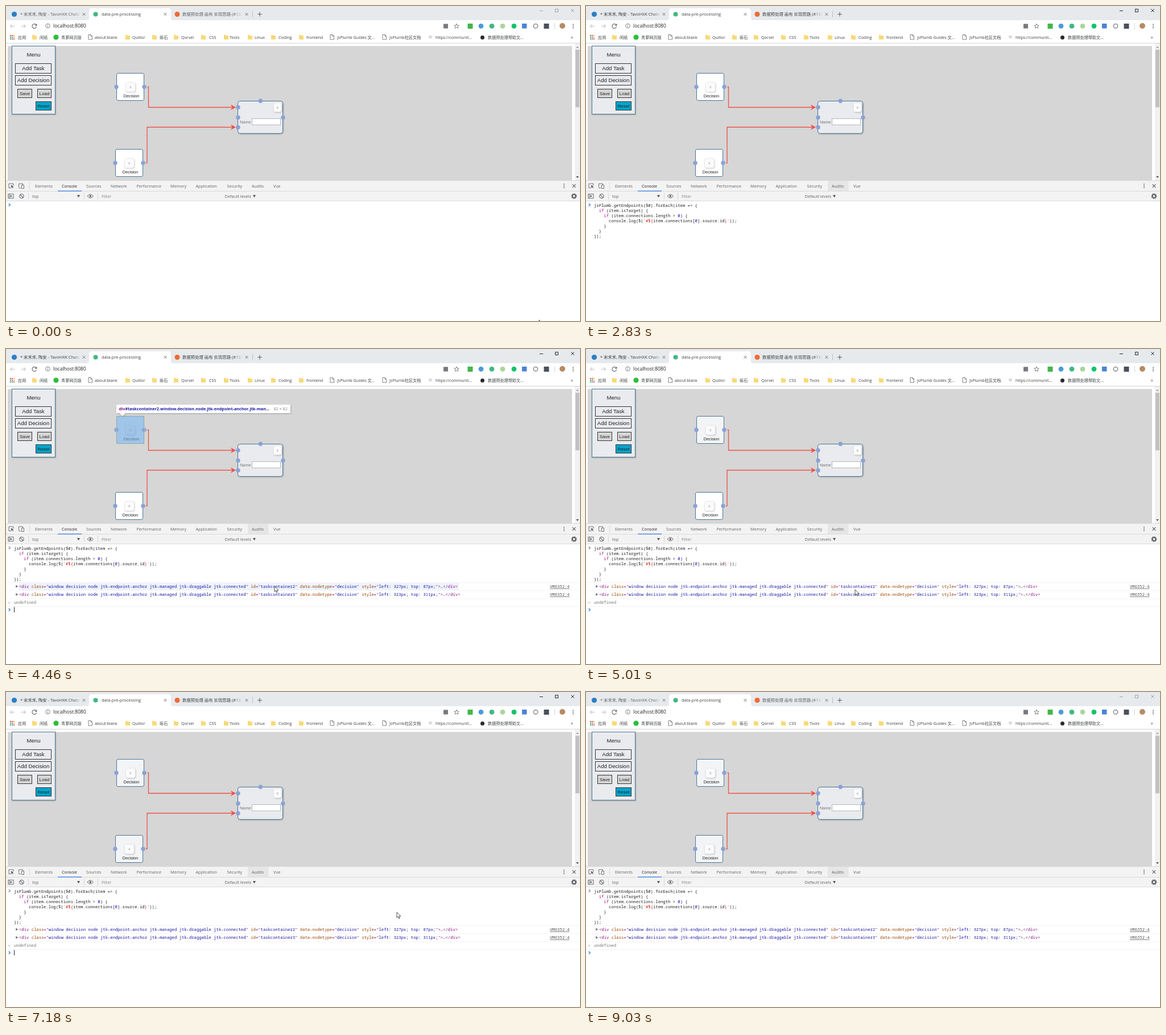
Write an HTML page that moves like this. It is 1009x555 px and loops after 9110 ms.

```html
<!DOCTYPE html>
<html lang="zh">
<head>
<meta charset="utf-8">
<title>Flow editor console</title>
<style>
html, body { margin: 0; width: 100%; height: 100%; overflow: hidden; background: #fff; }
svg { display: block; width: 1009px; height: 555px; }
text { white-space: pre; font-family: "Open Sans", "Noto Sans CJK SC", "Noto Sans CJK", sans-serif; }
.page { font-family: "Liberation Sans", Arial, sans-serif; }
.mono { font-family: "Noto Sans Mono", "DejaVu Sans Mono", monospace; }
</style>
</head>
<body>
<svg id="stage" viewBox="0 0 1009 555" xmlns="http://www.w3.org/2000/svg"></svg>
<script>
const LOOP = 9110;
const BLUE = '#4a7799', RED = '#ef4f48', STRIP = '#e7eaed', BAR = '#f3f3f3', INK = '#3c4043', GREY = '#5f6368';

const rect = (x, y, w, h, fill, more = '') =>
  `<rect x="${x}" y="${y}" width="${w}" height="${h}" fill="${fill}" ${more}/>`;
const dot = (x, y, r, fill, more = '') => `<circle cx="${x}" cy="${y}" r="${r}" fill="${fill}" ${more}/>`;
const line = (d, color, width = 1, more = '') =>
  `<path d="${d}" fill="none" stroke="${color}" stroke-width="${width}" ${more}/>`;
const fill = (d, color, more = '') => `<path d="${d}" fill="${color}" ${more}/>`;
const text = (x, y, s, size = 7.25, color = INK, more = '') =>
  `<text x="${x}" y="${y}" font-size="${size}" fill="${color}" ${more}>${s}</text>`;
const page = (x, y, s, size, color = '#222', more = '') => text(x, y, s, size, color, 'class="page" ' + more);
const mono = (x, y, s, color = '#222', more = '') => text(x, y, s, 7.23, color, 'class="mono" ' + more);
const group = (id, body, more = '') => `<g id="${id}" ${more}>${body}</g>`;
const span = (s, color) => `<tspan fill="${color}">${s}</tspan>`;
const cross = (x, y, r, color, width = 0.9) =>
  line(`M${x - r} ${y - r}l${2 * r} ${2 * r}m0 ${-2 * r}l${-2 * r} ${2 * r}`, color, width);
const more3 = (x, y) => [-3, 0, 3].map(d => dot(x, y + d, 0.9, GREY)).join('');
const down = (x, y, color = '#5a5a5a') => fill(`M${x - 2.6} ${y - 2}h5.2l-2.6 4.4z`, color);

function tabs() {
  const fade = x => rect(x, 6, 14, 17, 'url(#fade)') + rect(x + 13.5, 6, 26, 17, STRIP);
  return rect(0, 0, 1009, 25, STRIP) +
    group('titles', text(25, 17.3, '* 宋禾禾, 陶安 - TavoHXK Chats', 7.4) +
      text(310, 17.3, '数据预处理 画布 实现思路 (#133', 7.4)) +
    fade(118) + fade(402) +
    fill('M142 25q4 0 4-4V9q0-5 5-5H285q5 0 5 5V21q0 4 4 4z', '#fff') +
    dot(14.5, 14.5, 4.6, '#2d7fc4') + dot(157.5, 14.5, 4, '#41b883') + dot(301, 14.5, 4.5, '#ee6b35') +
    text(168, 17.3, 'data-pre-processing', 7.45) +
    [137, 280, 423].map(x => cross(x, 14.5, 2.4, GREY)).join('') +
    line('M433.5 9v11', '#a9adb2', 0.7) + line('M442 14.5h8M446 10.5v8', GREY, 1.1) +
    group('buttons', line('M938 8.5h6M965.5 5.5h5v5h-5zM993.3 5.3l5.4 5.4m0-5.4l-5.4 5.4', 'currentColor', 0.9));
}

function toolbar() {
  const ext = [[835, '#4a9bd8'], [854, '#41b883'], [873, '#a9d59a'], [893, '#15c26b']];
  return rect(0, 25, 1009, 41, '#fff') +
    line('M15 35.5H7.5M11 32l-3.6 3.5L11 39M27 35.5h7.5M31 32l3.6 3.5L31 39', '#b9bcc0', 1) +
    line('M53 33.2a3.9 3.9 0 1 0 .6 3.4', GREY, 1.1) + fill('M54.4 31v3.8h-3.8z', GREY) +
    dot(73.5, 35, 3.8, 'none', `stroke="${GREY}" stroke-width=".8"`) + line('M73.5 34.6v2.6M73.5 32.7v1', GREY, 0.9) +
    text(83, 38, 'localhost:8080', 8.55, '#202124') +
    rect(769, 31.5, 8, 8, '#777b80') +
    line('M792 31.2l1.2 2.8 3 .2-2.3 2 .8 3-2.7-1.7-2.7 1.7.8-3-2.3-2 3-.2z', GREY, 0.8) +
    rect(811.5, 31, 9, 9, '#43b649') + ext.map(([x, c]) => dot(x, 35.3, 4.4, c)).join('') +
    rect(907, 31, 8.5, 8.5, '#4c83d9') + dot(931, 35.3, 3.7, 'none', 'stroke="#9a9da1" stroke-width="1.8"') +
    rect(945.5, 31, 9, 9, '#4a505c') + line('M964.5 30v11', '#c9ccd0', 0.8) +
    dot(978, 35, 5, '#b98a62') + more3(997, 35.5) + bookmarks() +
    line('M0 65.5h1009', '#c8cacc', 0.8);
}

function bookmarks() {
  const folder = x => fill(`M${x} 51h3l1 1.2h4v6.8h-8z`, '#f9d976');
  const sheet = x => line(`M${x} 50.5h4l2.5 2.5v6h-6.5zM${x + 4} 50.5v2.5h2.5`, GREY, 0.8);
  const apps = ['#ea4d3f', '#ea4d3f', '#f2b736', '#3fa45b', '#4a80e0', '#f2b736', '#3fa45b', '#4a80e0', '#ea4d3f'];
  const labels = [[21, '应用'], [59, '闲纸'], [97, '青萝网页版'], [156, 'about:blank'], [222, 'Quillor'], [270, '砾石'],
    [308, 'Qorvel'], [357, 'CSS'], [393, 'Tools'], [437, 'Linux'], [479, 'Coding'], [528, 'frontend'],
    [582, 'jsPlumb Guides 文...'], [674, 'jsPlumb社区文档'], [755, 'https://communit...'], [847, '数据预处理帮助文...']];
  return apps.map((c, i) => rect(7 + i % 3 * 3, 51 + Math.floor(i / 3) * 3, 2, 2, c)).join('') +
    [46, 210, 257, 295, 343, 383, 425, 466, 515].map(folder).join('') +
    dot(88, 55, 4.6, '#2dbe3a') + [145, 570, 662].map(sheet).join('') +
    dot(746, 54.5, 3, '#d9dde1') + dot(837.5, 55.5, 3.5, '#2b2b2b') +
    labels.map(([x, s]) => text(x, 57.6, s, 7.15)).join('') + text(992.5, 57.5, '»', 9, GREY);
}

const node = (x, y, w, h, r, color, id = '') =>
  rect(x, y, w, h, color, `${id && `id="${id}"`} rx="${r}" stroke="${BLUE}" stroke-width="1"`);
const port = (x, y) => dot(x, y, 3.7, '#8aa2d8');
const remove = (x, y, w, h) => rect(x, y, w, h, '#fbfbfb', 'rx="3" stroke="#ddd" stroke-width=".5" filter="url(#soft)"') +
  page(x + w / 2, y + h / 2 + 2, 'x', 6.8, '#999', 'text-anchor="middle"');

const decision = (n, dx, dy) => `<g transform="translate(${dx} ${dy})">` +
  node(194.5, 118.5, 48, 48, 2.6, '#fff', 'box' + n) + remove(210.5, 134.5, 16.5, 16.5) +
  page(206.8, 161, 'Decision', 7.2) + port(194, 142.5) + port(243, 142.5) + '</g>';

function menu() {
  const button = (x, y, w, h, s, size, color) => rect(x, y, w, h, color, 'stroke="#333" stroke-width="1"') +
    page(x + w / 2, y + h / 2 + size * 0.35, s, size, '#222', 'text-anchor="middle"');
  return rect(10.5, 70.5, 76, 120, '#e9ebee', `stroke="${BLUE}" stroke-width="1" filter="url(#soft)"`) +
    page(48.5, 89.3, 'Menu', 9.6, '#222', 'text-anchor="middle"') +
    button(16.5, 101.5, 63, 17, 'Add Task', 9.6, '#e9ebee') +
    button(16.5, 122.5, 63, 17, 'Add Decision', 9.6, '#e9ebee') +
    button(20.5, 146.5, 25, 15, 'Save', 8, '#d6d6d6') +
    button(55.5, 146.5, 24, 15, 'Load', 8, '#d6d6d6') +
    button(52.5, 168.5, 27, 15, 'Reset', 8, '#00a5cc');
}

function canvas() {
  const head = y => fill(`M403.5 ${y}l-8-4.2 2.7 4.2-2.7 4.2z`, RED, `stroke="${RED}" stroke-width=".6"`);
  return rect(0, 66, 1009, 241, '#fff') + rect(3, 70.5, 992, 236.5, '#d6d6d6') +
    rect(1000, 66, 9, 241, '#f1f1f1') + rect(1001, 77, 7, 101.5, '#c1c1c1') +
    fill('M1002 74h5l-2.5-3z', '#a3a3a3') + fill('M1002 300h5l-2.5 3z', '#505050') + menu() +
    line('M248.5 142.5h2v36H400', RED, 1.3) + head(178.5) +
    line('M246 276.5h2V213.5H400', RED, 1.3) + head(213.5) +
    decision(1, 0, 0) + decision(2, -2, 134) +
    `<g filter="url(#soft)">${node(407.5, 167.5, 79, 57, 4, '#e9ebee')}</g>` +
    remove(470.5, 170.5, 13.5, 16) + page(411, 206.7, 'Name', 7.4, '#777') +
    rect(432.5, 198.5, 50, 11, '#fff', 'stroke="#aaa" stroke-width=".8"') +
    [[447.3, 167.3], [487, 196.5], [408, 178.5], [408, 196.5], [408, 213.7]].map(p => port(...p)).join('');
}

function devtools() {
  const names = [[51, 'Elements'], [98, 'Console'], [141, 'Sources'], [184, 'Network'], [229.5, 'Performance'], [289, 'Memory'],
    [333.5, 'Application'], [388.5, 'Security'], [432, 'Audits'], [470, 'Vue']];
  const gear = dot(998.5, 335, 2.9, 'none', `stroke="${GREY}" stroke-width="2"`) +
    dot(998.5, 335, 4.3, 'none', `stroke="${GREY}" stroke-width="1.3" stroke-dasharray="1.7 1.68"`);
  return rect(0, 307, 1009, 248, '#fff') + rect(0, 307, 1009, 36.5, BAR) +
    group('hover', rect(425, 308, 36.5, 18, '#e6e6e6')) +
    line('M0 307.5h1009M0 326.3h1009M0 343.5h1009', '#cfcfcf', 0.7) +
    rect(91, 325.3, 42, 1.3, '#3b82e6') +
    names.map(([x, s]) => text(x, 319.6, s, 7.2, s === 'Console' ? '#222' : GREY)).join('') +
    line('M9 320.5H5v-7.5h8v3', GREY, 0.9) + fill('M8.5 315.5l5 2-2 .9 1.8 1.8-.9.9-1.8-1.8-.9 1.7z', GREY) +
    line('M22.5 319v-6h7v2M22 320.5h4M27.5 315.5h4v6h-4z', GREY, 0.9) + line('M41.5 311v12', '#ccc', 0.7) +
    more3(981, 317) + cross(998.5, 317, 2.8, GREY, 1.2) +
    rect(4, 331.2, 9, 7.6, 'none', `stroke="${GREY}" stroke-width=".9"`) + fill('M7.5 332.8l3.5 2.2-3.5 2.2z', GREY) +
    line('M6 331v8', GREY, 0.8) +
    dot(27.5, 335, 3.7, 'none', `stroke="${GREY}" stroke-width="1.1"`) + line('M25 332.4l5 5.2', GREY, 1.1) +
    line('M39.5 329v12M137.5 329v12M161.5 329v12', '#ccc', 0.7) +
    text(46, 337.7, 'top', 7.3, GREY) + down(127.5, 335) +
    line('M143 335q5-6.4 10.4 0q-5.4 6.4-10.4 0z', GREY, 1) + dot(148.2, 335, 1.8, GREY) +
    text(168, 337.9, 'Filter', 7.4, '#80868b') + text(384.5, 337.7, 'Default levels', 7.45, GREY) + down(436.5, 335) + gear;
}

const chevron = (id, y, color) => line(`M4.8 ${y - 2.4}l2.6 2.4-2.6 2.4`, color, 1.3, `id="${id}"`);

function code() {
  const key = s => span(s, '#aa0d91'), num = s => span(s, '#1c00cf'), str = s => span(s, '#c41a16');
  return ['jsPlumb.getEndpoints($0).forEach(item =&gt; {',
    `  ${key('if')} (item.isTarget) {`,
    `    ${key('if')} (item.connections.length &gt; ${num(0)}) {`,
    `      console.log($(${str('`#${')}item.connections[${num(0)}].source.id${str('}`')}));`,
    '    }', '  }', '});'].map((s, i) => mono(14, 353.5 + i * 9, s)).join('');
}

function logRow(n, y, id, style) {
  const tag = '#881280';
  const attr = (k, v) => ' ' + span(k, '#994500') + '="' + span(v, '#1a1aa6') + '"';
  return rect(23, y - 6.2, n === 1 ? 773 : 777, 12.6, '#eef3fb', `id="row${n}"`) +
    fill(`M17.3 ${y - 2.7}l3.8 2.5-3.8 2.5z`, '#6e6e6e') +
    mono(23, y + 2.4, '&lt;div' +
      attr('class', 'window decision node jtk-endpoint-anchor jtk-managed jtk-draggable jtk-connected') +
      attr('id', id) + attr('data-nodetype', 'decision') + attr('style', style) +
      '&gt;' + span('…', '#555') + '&lt;/div&gt;', tag) +
    mono(956, y + 2.4, 'VM6352:4', '#555', 'text-decoration="underline"');
}

const output = () => line('M0 411.5h1009M0 425.7h1009M0 440h1009M0 453.5h1009', '#f0f0f0', 0.8) +
  logRow(1, 418.5, 'taskcontainer2', 'left: 327px; top: 87px;') +
  logRow(2, 432.8, 'taskcontainer3', 'left: 323px; top: 311px;') +
  line('M6.3 444.7l-2.2 2.2 2.2 2.2', '#aaa', 0.8) + dot(7.5, 446.9, 0.6, '#aaa') +
  mono(14, 449.4, 'undefined', '#777');

const inspect = (n, x, y) => group('tip' + n,
  rect(x, y, 49, 49, '#6fa8dc', 'fill-opacity=".66" stroke="#d0c9a0" stroke-width=".8"') +
  `<g filter="url(#soft)">${fill(`M${x} ${y - 20}h306v15h-290l-5 5-5-5h-6z`, '#fff')}</g>` +
  text(x + 4.5, y - 9.6, span('div', '#881280') +
    `#taskcontainer${n + 1}.window.decision.node.jtk-endpoint-anchor.jtk-man...`, 7.28, '#1a1aa6', 'font-weight="700"') +
  text(x + 276.5, y - 9.6, '82 × 82', 7.2, '#888'));

const pointer = group('arrow', fill('M0 0V9.7L2.2 7.6 3.8 11.2 5.3 10.5 3.8 7.1H6.9Z', '#fff', 'stroke="#222" stroke-width=".75"')) +
  group('resize', line('M519 311v10M516.8 313l2.2-2.4 2.2 2.4M516.8 319l2.2 2.4 2.2-2.4', '#333', 0.9));

document.getElementById('stage').innerHTML = `<defs>
  <linearGradient id="fade"><stop stop-color="${STRIP}" stop-opacity="0"/><stop offset="1" stop-color="${STRIP}"/></linearGradient>
  <filter id="soft" x="-20%" y="-30%" width="150%" height="170%">
    <feDropShadow dx=".8" dy="1" stdDeviation=".8" flood-color="#000" flood-opacity=".25"/></filter></defs>` +
  tabs() + toolbar() + canvas() + devtools() +
  group('code', code()) + group('output', output()) +
  chevron('chevronTop', 350.3, '#367cf1') + chevron('chevronLow', 459.3, '#367cf1') +
  rect(0, 0, 1, 9.5, '#222', 'id="caret"') + inspect(1, 194, 118) + inspect(2, 192, 252) + pointer;

// Step tables: each entry holds from its time until the next one.
const MOUSE = [[0, 937, 553], [70, 900, 497], [150, 828, 442], [220, 740, 388], [300, 650, 352], [380, 575, 336], [450, 526, 326],
  [530, 519, 316], [600, 482, 281], [680, 474, 292], [760, 446, 325], [830, 430, 332], [910, 418, 345], [980, 414, 348],
  [1060, 446, 372], [1140, 482, 397], [1210, 494, 405], [1290, 495, 401], [2300, -20, 0],
  [3840, 494, 404], [3920, 487, 413], [3990, 478, 417], [4060, 473, 418], [4460, 472, 418],
  [5010, 473, 424], [5080, 478, 427], [5160, 480, 428], [5700, 481, 428], [5770, 520, 420], [5850, 592, 406], [5930, 658, 393], [6000, 687, 388]];
const CARET = [[0, 0], [980, 1], [1520, 0], [2050, 1], [2830, 0], [3000, 1], [3540, 0], [4060, 1], [4610, 0], [5160, 1],
  [5620, 0], [6170, 1], [6720, 0], [7180, 1], [7720, 0], [8260, 1], [8800, 0]];
const ROW = [[0, 0], [3990, 1], [5010, 0], [5080, 2], [5770, 0]];
const LEAVE = { from: 7560, step: 78, count: 11 };

const at = (table, t) => table.findLast(entry => entry[0] <= t);
const el = id => document.getElementById(id);
const show = (id, on) => el(id).setAttribute('visibility', on ? 'visible' : 'hidden');

function mouseAt(t) {
  if (t < LEAVE.from) return at(MOUSE, t).slice(1);
  const k = Math.min(1, (Math.floor((t - LEAVE.from) / LEAVE.step) + 1) / LEAVE.count);
  return [687 + 290 * k, 388 + 170 * k];
}

function draw(t) {
  const active = t >= 980 && t < 9030, ran = t >= 3000, row = at(ROW, t)[1], resizing = t >= 530 && t < 600;
  el('buttons').setAttribute('color', active ? '#111' : '#999');
  el('titles').setAttribute('opacity', active ? 1 : 0.8);
  show('hover', t >= 760);
  show('code', t >= 2300);
  show('output', ran);
  show('chevronLow', ran);
  el('chevronTop').setAttribute('stroke', ran ? '#8a8a8a' : '#367cf1');
  for (const n of [1, 2]) {
    show('row' + n, row === n);
    show('tip' + n, row === n);
  }
  el('box1').setAttribute('fill', t >= 5010 ? '#f3f4f5' : '#fff');
  el('box2').setAttribute('fill', t >= 5770 ? '#f3f4f5' : '#fff');
  show('caret', at(CARET, t)[1]);
  el('caret').setAttribute('x', t >= 2300 && !ran ? 196 : 14);
  el('caret').setAttribute('y', ran ? 454.5 : 345.5);
  show('arrow', !resizing);
  show('resize', resizing);
  el('arrow').setAttribute('transform', `translate(${mouseAt(t)})`);
}

function tick() {
  draw(performance.now() % LOOP);
  requestAnimationFrame(tick);
}
tick();
</script>
</body>
</html>
```
